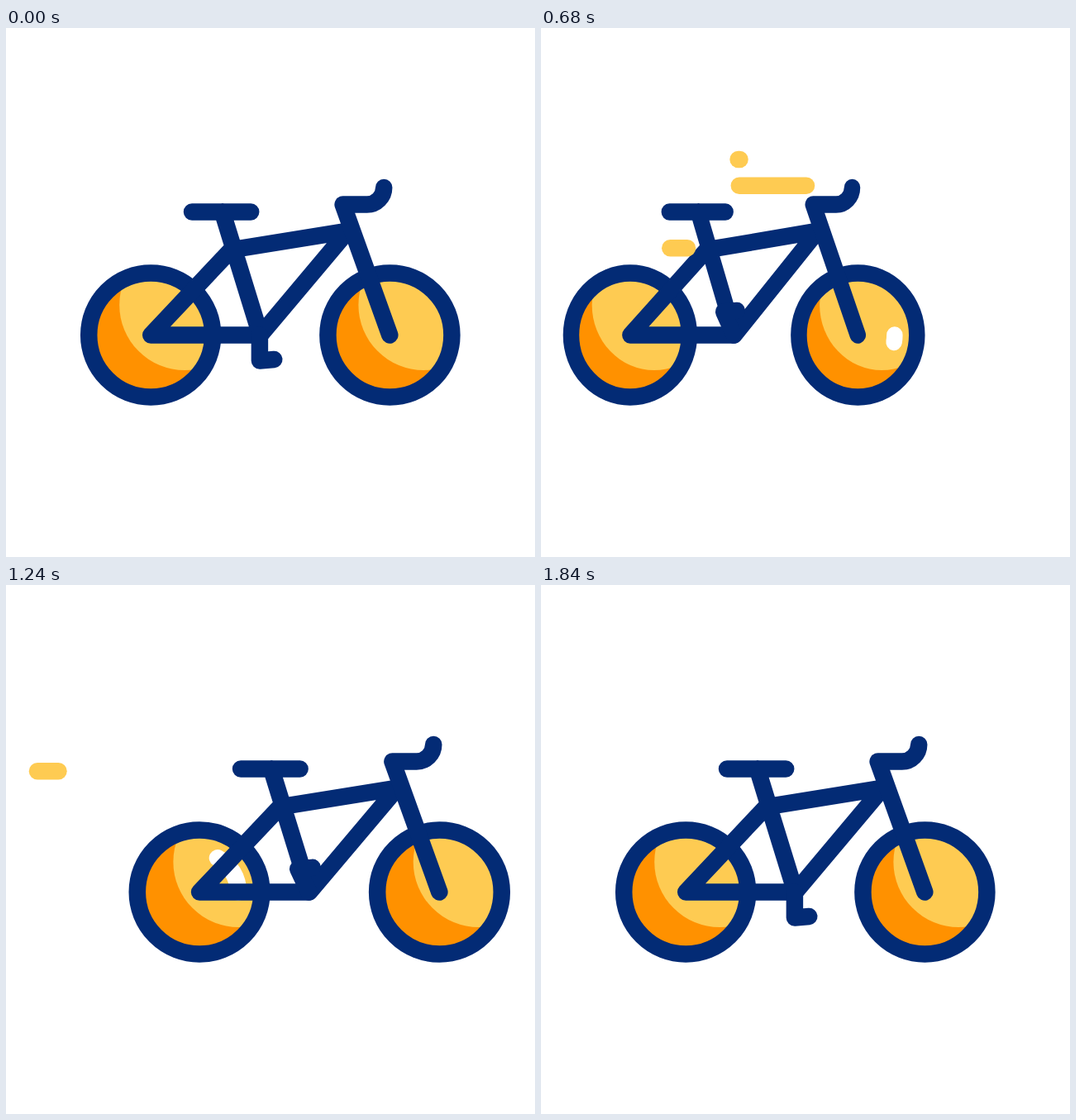
Animation, 640 px wide and 640 px high, one loop 2000 ms. Source, as an HTML page:

```html
<!DOCTYPE html>
<html lang="en">
<head>
<meta charset="utf-8">
<title>Bicycle</title>
<style>
  html, body { margin: 0; width: 100%; height: 100%; overflow: hidden; background: #fff; }
  svg { display: block; width: 100vw; height: 100vh; }
  path, .ring { fill: none; stroke: #032b75; stroke-width: 20.5; stroke-linecap: round; stroke-linejoin: round; }
  .shade { fill: #ff9100; }
  .light { fill: #fecb52; }
  .glint { stroke: #fff; }
  .wind { stroke: #fecb52; }
</style>
</head>
<body>
<svg viewBox="0 0 640 640">
  <defs>
    <clipPath id="rim"><circle r="70"/></clipPath>
  </defs>
  <g id="bike">
    <g id="wheels"></g>
    <path d="M225 222.5H296.2M261.7 222.3L307.7 371.5M175.2 371.5L272.4 268.4L413.5 245.7L307.7 371.5Z"/>
    <path d="M464.3 371.5L407.6 213.5H436.7A20.5 20.5 0 0 0 457.2 193"/>
    <path id="crank"/>
  </g>
  <g id="winds"></g>
</svg>
<script>
const LOOP = 2000, STEP = 40, MID = 319.75;
const $ = id => document.getElementById(id);

function add(parent, tag, attrs) {
  const el = document.createElementNS('http://www.w3.org/2000/svg', tag);
  for (const k in attrs) el.setAttribute(k, attrs[k]);
  return parent.appendChild(el);
}

// Eased progress from 0 to 1
function ease(t, start, length) {
  const p = Math.min(1, Math.max(0, (t - start) / length));
  return p * p * (3 - 2 * p);
}

// Rest, lean back, rush ahead, return to rest
const pose = (t, rest, back, ahead) =>
  rest + (back - rest) * ease(t, 193, 452)
       + (ahead - back) * ease(t, 645, 600)
       + (rest - ahead) * ease(t, 1245, 550);

// Hub x, and when the glint's head and tail set off
const wheels = [[175.2, 736, 1034], [464.4, 641, 939]].map(([x, head, tail]) => {
  const g = add($('wheels'), 'g', { transform: `translate(${x} 371.5)` });
  const disc = add(g, 'g', { 'clip-path': 'url(#rim)' });
  add(disc, 'circle', { r: 70, class: 'shade' });
  const light = add(disc, 'circle', { cy: -36.5, r: 79, class: 'light' });
  const glint = add(g, 'path', { class: 'glint' });
  add(g, 'circle', { r: 75, class: 'ring' });
  return { light, glint, head, tail };
});

// y, right end, left end, and when head and tail set off
const winds = [
  [159, 240.5, 107, 661, 950],
  [190.7, 321, 94.5, 572, 831],
  [225.3, 177, 38, 818, 1046],
  [266.2, 177, 38, 615, 890]
].map(([y, right, left, head, tail]) =>
  ({ el: add($('winds'), 'path', { class: 'wind' }), y, right, left, head, tail }));

function arc(from, to) {
  if (to - from < 0.1) return '';
  const at = deg => {
    const a = deg * Math.PI / 180;
    return `${46.7 * Math.cos(a)} ${46.7 * Math.sin(a)}`;
  };
  return `M${at(from)}A46.7 46.7 0 ${to - from > 180 ? 1 : 0} 1 ${at(to)}`;
}

function draw(t) {
  const x = MID + pose(t, 0, -75.5, 59.5);
  $('bike').setAttribute('transform',
    `translate(${x} 0) scale(${pose(t, 1, 0.952, 1.004)} 1) translate(${-MID} 0)`);

  // The crank turns twice while the pedal stays level
  const turn = ease(t, 200, 1605) * 4 * Math.PI;
  const px = 306.9 - 31 * Math.sin(turn), py = 371.5 + 31 * Math.cos(turn);
  $('crank').setAttribute('d', `M306.9 371.5L${px} ${py}l17.4 -1.5`);

  for (const w of wheels) {
    w.light.setAttribute('cx', 41 + pose(t, 0, -10.7, 6.4));
    w.glint.setAttribute('d', arc(360 * ease(t, w.tail, 280), 360 * ease(t, w.head, 385)));
  }

  for (const w of winds) {
    const at = start => w.right + (w.left - w.right) * ease(t, start, 267);
    const head = at(w.head), tail = at(w.tail);
    w.el.setAttribute('d', tail - head > 0.1 ? `M${tail} ${w.y}H${head}` : '');
  }
}

function tick(now) {
  draw(Math.floor((now % LOOP) / STEP) * STEP);
  requestAnimationFrame(tick);
}
draw(0);
requestAnimationFrame(tick);
</script>
</body>
</html>
```
